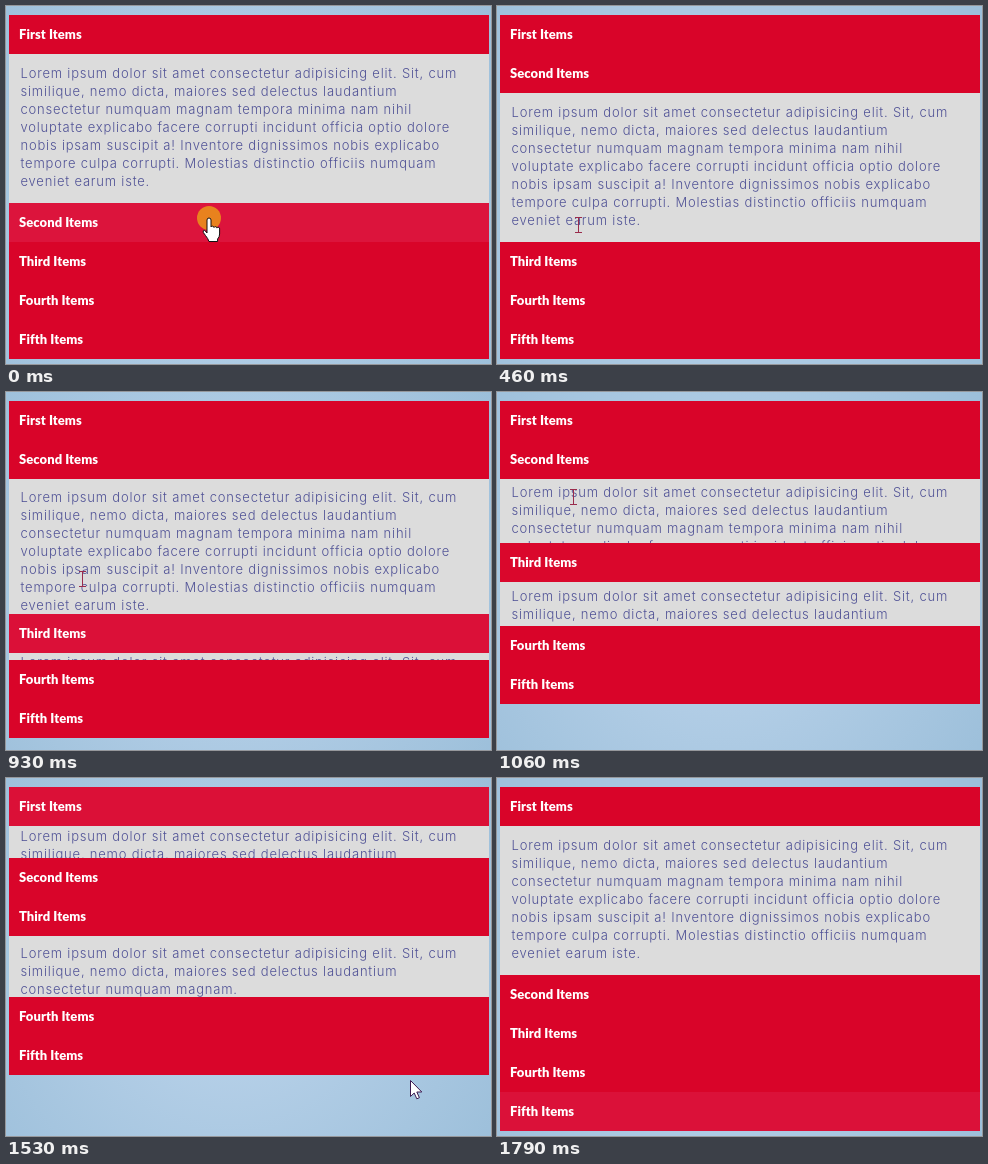
Recreate the animation shown at these times as an HTML page. Size 485 px wide and 358 px high, loop 1.86 s.

```html
<!DOCTYPE html>
<html lang="en">
<head>
<meta charset="utf-8">
<title>Accordion</title>
<style>
  html, body { margin: 0; width: 100%; height: 100%; overflow: hidden; }
  body { position: relative; background: radial-gradient(circle 320px at 225px 190px, #bfd6ed, #9cbfda); }
  #list { position: absolute; left: 3px; top: 9px; width: 480px; }
  h2 { margin: 0; height: 39px; padding-left: 10px; color: #fff; background: #d90429;
       font: 900 13px/39px Lato, sans-serif; letter-spacing: .05px; }
  .panel { overflow: hidden; background: gainsboro; }
  p { margin: 0; padding-left: 11.5px; white-space: pre; color: #505296;
      font: 300 13px/18px Inter, sans-serif; letter-spacing: .8px; }
  svg { position: absolute; left: 0; top: 0; width: 485px; height: 358px; }
</style>
</head>
<body>
<div id="list"></div>
<svg>
  <g id="cursor">
    <circle id="click" r="12" fill="#e8821e"/>
    <path id="hand" fill="#fff" stroke="#111" d="M-2 15V2a2 2 0 0 1 4 0V9a1.6 1.6 0 0 1 3 .5a1.6 1.6 0 0 1 3 .6a1.4 1.4 0 0 1 2.6 1V16q0 3-2 5v2.5H0q-1-3-3.5-6l-2.3-3.2q-.5-2 1.5-2z"/>
    <path id="beam" fill="none" stroke="#9a2c4c" d="M-3 -7.5H4M.5 -7.5V7.5M-3 7.5H4"/>
    <path id="arrow" fill="#fff" stroke="#3c1a50" d="M.5 .5V16.5l3.7-3.5 2.6 5.8 2.6-1.1-2.6-5.7h5z"/>
  </g>
</svg>
<script>
const LOOP = 1860, FRAMES = 28, SLIDE = 378, FADE = 220, HEAD = 39, TOP = 9;
const $ = id => document.getElementById(id);

const short = `Lorem ipsum dolor sit amet consectetur adipisicing elit. Sit, cum
similique, nemo dicta, maiores sed delectus laudantium
consectetur numquam magnam`;
const long = short + ` tempora minima nam nihil
voluptate explicabo facere corrupti incidunt officia optio dolore
nobis ipsam suscipit a! Inventore dignissimos nobis explicabo
tempore culpa corrupti. Molestias distinctio officiis numquam
eveniet earum iste.`;

function add(parent, tag, text = '') {
  const el = parent.appendChild(document.createElement(tag));
  el.textContent = text;
  return el;
}

const items = ['First', 'Second', 'Third', 'Fourth', 'Fifth'].map((name, i) => {
  const text = i < 2 ? long : short + '.';
  const head = add($('list'), 'h2', name + ' Items');
  const panel = add($('list'), 'div');
  panel.className = 'panel';
  return { head, panel, body: add(panel, 'p', text), full: 18 * text.split('\n').length + 23 };
});

// Moments of the clicks on the second, third and first header
const clicks = [67.5, 854.5, 1415];
// Pointer stops: time, x, y
const stops = [[0, 203, 212], [260, 125, 172], [460, 81, 219], [700, 80, 248], [860, 79, 248],
  [930, 76, 187], [1190, 76, 23], [1460, 90, 17], [1530, 404, 302], [1590, 520, 320]];

const clamp = x => Math.min(1, Math.max(0, x));
const swing = x => .5 - Math.cos(Math.PI * clamp(x)) / 2;
const show = (id, on) => $(id).style.display = on ? '' : 'none';

function pointer(t) {
  const i = Math.max(1, stops.findIndex(s => s[0] > t));
  const [from, to] = t < stops.at(-1)[0] ? [stops[i - 1], stops[i]] : stops.slice(-2);
  const f = swing((t - from[0]) / (to[0] - from[0]));
  return [1, 2].map(j => from[j] + (to[j] - from[j]) * f);
}

// Opening of each panel, and what lies under the pointer
function state(t) {
  const [a, b, c] = clicks.map(s => swing((t - s) / SLIDE));
  const open = [1 - a + c, a - b, b - c, 0, 0];
  const [x, y] = pointer(t);
  let edge = TOP, shape = 'arrow', over = -1;
  const heights = items.map((item, i) => {
    const height = Math.round(item.full * open[i]), body = edge + HEAD;
    if (y >= edge && y < body) [shape, over] = ['hand', i];
    else if (y >= body && y < body + height) shape = 'beam';
    edge = body + height;
    return height;
  });
  return { open, heights, x, y, shape, over };
}

// A header's tint is the share of the last FADE ms the pointer spent on it
function tints(t) {
  const sum = items.map(() => 0), n = 22;
  for (let k = 0; k < n; k++) {
    const { over } = state(t - k * FADE / n);
    if (over >= 0) sum[over] += 1 / n;
  }
  return sum;
}

function draw(t) {
  const { open, heights, x, y, shape } = state(t), tint = tints(t);
  items.forEach(({ head, panel, body }, i) => {
    panel.style.height = heights[i] + 'px';
    body.style.transform = `translateY(${Math.round(11 * open[i]) - 1}px)`;
    head.style.background = `color-mix(in srgb, crimson ${100 * tint[i]}%, #d90429)`;
  });
  for (const id of ['hand', 'beam', 'arrow']) show(id, id === shape);
  show('click', clicks.some(s => t > s - 90 && t < s + 10));
  $('cursor').setAttribute('transform', `translate(${Math.round(x)} ${Math.round(y)})`);
}

// Motion advances in 28 even steps on a 10 ms clock
const tick = k => 10 * Math.round((66.4 * k - 1.3) / 10);
function step(t) {
  let k = FRAMES - 1;
  while (k && tick(k) > t) k--;
  return tick(k);
}

const start = performance.now();
function frame() {
  draw(step((performance.now() - start) % LOOP));
  requestAnimationFrame(frame);
}
frame();
</script>
</body>
</html>
```
